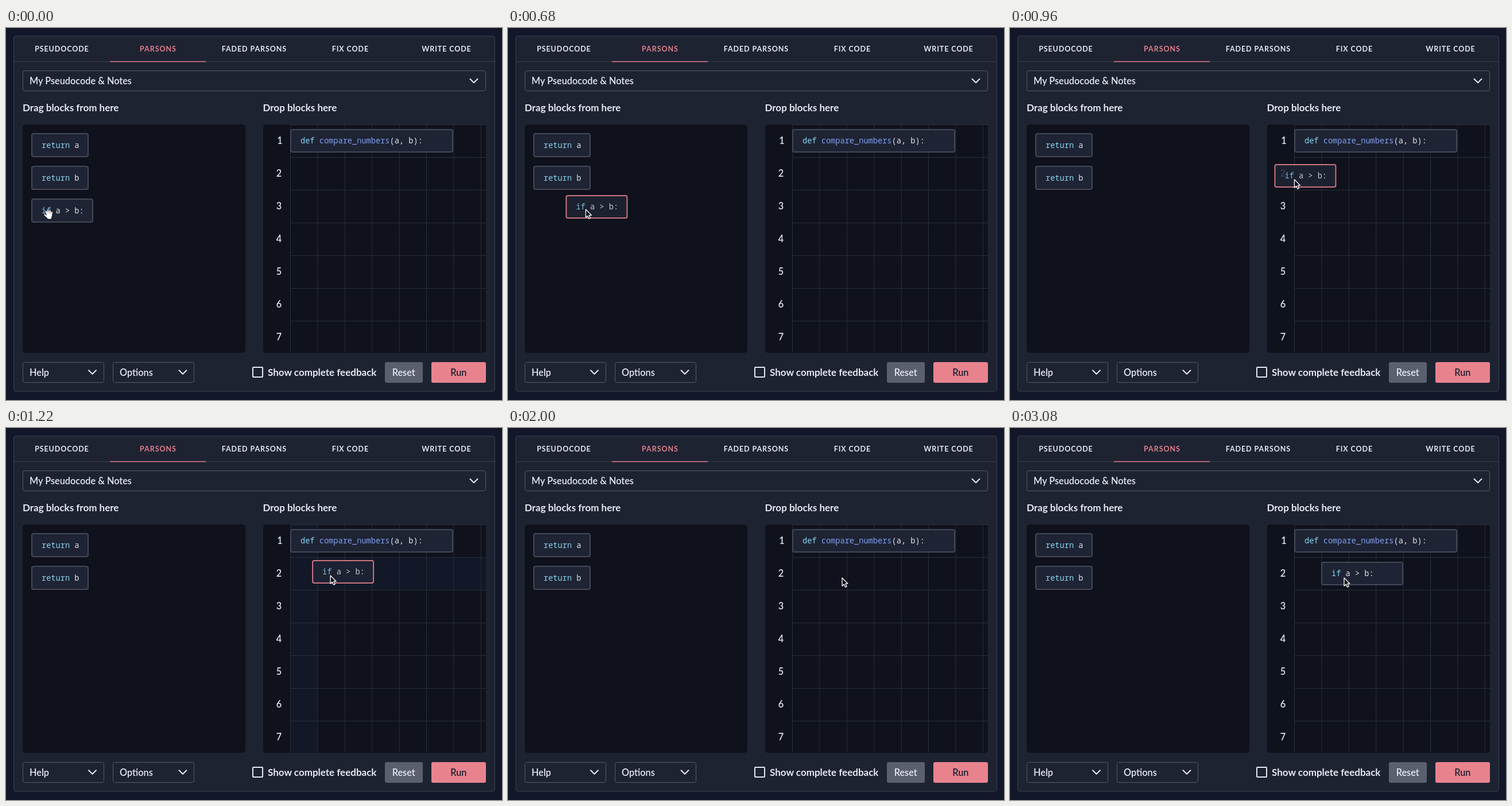
Animation, 864 px wide and 648 px high, one loop 3200 ms. Source, as an HTML page:

```html
<!DOCTYPE html>
<html lang="en">
<head>
<meta charset="utf-8">
<title>Drag a code block</title>
<style>
  html, body { margin: 0; width: 100%; height: 100%; overflow: hidden; background: #13172a; }
  svg { display: block; width: 864px; height: 648px; }
  text { font: 600 16.3px Lato, sans-serif; fill: #e5e8f3; }
  .mid { text-anchor: middle; }
  .tab { font-size: 12.5px; font-weight: 700; letter-spacing: .9px; }
  .label { font-size: 17px; font-weight: 700; }
  .code { font: 400 13.65px "Noto Sans Mono", monospace; white-space: pre; fill: #dfe3ef; }
  .key { fill: #89d6f0; }
  .name { fill: #7f9ff0; }
  .field { fill: none; stroke: #555a6b; }
  .panel { fill: #0f121c; }
  .grid { fill: none; stroke: #2b2f3c; }
  .hot { fill: #121828; }
  .block { fill: #1f2434; stroke: #434859; stroke-width: 2; }
  .chevron { fill: none; stroke: #e5e8f3; stroke-width: 2; stroke-linecap: round; stroke-linejoin: round; }
</style>
</head>
<body>
<svg id="stage" viewBox="0 0 864 648"></svg>
<script>
const LOOP = 3200, GRAB = 440, DROP = 1680, LANDED = 1960, PLACED = 2040;
const GRID = { x: 495.5, y: 168.5, w: 47.4, h: 57 };
const stage = document.getElementById("stage");

function add(tag, attrs, parent = stage) {
  const el = document.createElementNS("http://www.w3.org/2000/svg", tag);
  for (const k in attrs) el.setAttribute(k, attrs[k]);
  parent.append(el);
  return el;
}

function box(x, y, width, height, attrs, parent) {
  return add("rect", { x, y, width, height, rx: 3, ...attrs }, parent);
}

function label(x, y, str, cls = "", attrs = {}) {
  add("text", { x, y, class: cls, ...attrs }).textContent = str;
}

function chevron(x, y) {
  add("path", { d: `M${x - 6.5} ${y - 3.2}l6.5 6.5 6.5 -6.5`, class: "chevron" });
}

// parts: [text, class] pairs drawn on one code line
function codeBlock(x, y, w, h, parts, attrs = {}) {
  const g = add("g", { transform: `translate(${x} ${y})` });
  box(1, 1, w - 2, h - 2, { class: "block", ...attrs }, g);
  const line = add("text", { x: 18, y: h / 2 + 4.8, class: "code" }, g);
  for (const [str, cls] of parts) add("tspan", { class: cls }, line).textContent = str;
  return g;
}

// Card, tabs and controls
box(13.5, 14, 838, 619, { fill: "#1e2332", stroke: "#3a3f50", rx: 4 });
add("path", { d: "M14 58.5H851", stroke: "#3a3f50" });
add("path", { d: "M181 58.5H348", stroke: "#e27e8a", "stroke-width": 1.4 });
["PSEUDOCODE", "PARSONS", "FADED PARSONS", "FIX CODE", "WRITE CODE"].forEach((str, i) =>
  label(97.4 + 167.5 * i, 41, str, "tab mid", i === 1 ? { style: "fill:#e27e8a" } : {}));

box(29.5, 74.5, 806, 35, { class: "field" });
label(41, 98, "My Pseudocode & Notes");
chevron(815, 92);
label(29, 145, "Drag blocks from here", "label");
label(447.5, 145, "Drop blocks here", "label");

box(29.5, 582.5, 141, 35, { class: "field" });
label(41, 606, "Help");
chevron(150.5, 599.5);
box(186.5, 582.5, 141, 35, { class: "field" });
label(198, 606, "Options");
chevron(308, 599.5);
box(430, 591, 17, 17, { fill: "none", stroke: "#e5e8f3", "stroke-width": 2, rx: 1 });
label(456, 605.5, "Show complete feedback", "label");
box(660, 582, 66, 36, { fill: "#5b6070" });
label(692.7, 606, "Reset", "mid");
box(741, 582, 95, 36, { fill: "#e8838e" });
label(788.3, 606, "Run", "mid", { style: "fill:#1c2030" });

// Panels and drop grid
box(29, 168, 388, 398, { class: "panel", rx: 5 });
box(448, 168, 388, 398, { class: "panel", rx: 5 });
const hotRow = add("rect", { x: GRID.x, width: 340.5, height: GRID.h, class: "hot" });
const hotCol = add("rect", { y: 168, width: GRID.w, height: 398, class: "hot" });
let lines = "";
for (let i = 0; i < 8; i++) lines += `M${GRID.x + GRID.w * i} 168V566`;
for (let i = 0; i < 7; i++) lines += `M${GRID.x} ${GRID.y + GRID.h * i}H836`;
add("path", { d: lines, class: "grid" });
for (let i = 0; i < 7; i++) label(i ? 475.5 : 477, 202 + GRID.h * i, i + 1, "mid");

// Code blocks
const condition = [["if", "key"], [" a > b:", ""]];
codeBlock(44, 183, 100, 42, [["return", "key"], [" a", ""]]);
codeBlock(44, 240, 100, 42, [["return", "key"], [" b", ""]]);
codeBlock(495, 176, 284, 41,
  [["def ", "key"], ["compare_numbers", "name"], ["(a, b):", ""]]);
const waiting = codeBlock(44, 297, 108, 42, condition);
const placed = codeBlock(542, 233, 143, 41, condition);
const dragged = codeBlock(0, 0, 108, 41, condition, { style: "stroke:#e8838e" });
dragged.setAttribute("opacity", .87);

// Cursors
const hand = add("g", {});
const fingers = "M-4.3 -5.5L-2 0M-1 -7L0 0M2.5 -6.5V0M5.6 -4L5 1M-6.3 .5L-2.5 4M-2 0H5L3.8 6.2H-.8Z";
for (const [stroke, width] of [["#10131d", 4.4], ["#fff", 2.5]])
  add("path", { d: fingers, fill: "#fff", stroke, "stroke-width": width,
    "stroke-linecap": "round", "stroke-linejoin": "round" }, hand);
const arrow = add("path", {
  d: "M0 0V14.2L3.3 11.2 5.5 16.2 8 15.1 5.8 10.2H10Z",
  fill: "#0b0d13", stroke: "#fff", "stroke-width": 1.3, "stroke-linejoin": "round"
});

// time, block x, block y, pointer x, pointer y
const path = [
  [440, 44, 297, 78, 323],
  [680, 100, 291, 135, 316],
  [780, 268, 259, 305, 286],
  [960, 460, 237, 495, 264],
  [1220, 533, 230, 565, 257],
  [1440, 548, 234, 582, 261]
];

const slope = (i, k) => (path[i + 1][k] - path[i][k]) / (path[i + 1][0] - path[i][0]);

function tangent(i, k) {
  if (i === 0 || i === path.length - 1) return 0;
  const a = slope(i - 1, k), b = slope(i, k);
  return a * b > 0 ? 2 * a * b / (a + b) : 0;
}

// Monotone cubic through the path rows
function at(t, k) {
  const last = path.length - 1;
  if (t <= path[0][0]) return path[0][k];
  if (t >= path[last][0]) return path[last][k];
  const i = path.findIndex(p => p[0] > t) - 1;
  const d = path[i + 1][0] - path[i][0], u = (t - path[i][0]) / d;
  const s = u * u * (3 - 2 * u);
  return path[i][k] * (1 - s) + path[i + 1][k] * s
    + d * u * (1 - u) * ((1 - u) * tangent(i, k) - u * tangent(i + 1, k));
}

const clamp = v => Math.min(1, Math.max(0, v));
const show = (el, on) => el.setAttribute("visibility", on ? "visible" : "hidden");
const move = (el, x, y) => el.setAttribute("transform", `translate(${x.toFixed(2)} ${y.toFixed(2)})`);

function draw(t) {
  const dragging = t >= GRAB && t < DROP;
  const settle = 1 - (1 - clamp((t - DROP) / 250)) ** 3;
  const x = at(t, 1), y = at(t, 2);
  show(waiting, t < GRAB);
  show(dragged, t >= GRAB && t < LANDED);
  show(placed, t >= PLACED);
  move(dragged, x + (542 - x) * settle, y + (233 - y) * settle);

  const col = Math.floor((x - GRID.x) / GRID.w);
  const row = Math.floor((y + 20 - GRID.y) / GRID.h);
  show(hotRow, dragging && col >= 0);
  show(hotCol, dragging && col >= 0);
  hotRow.setAttribute("y", GRID.y + row * GRID.h);
  hotCol.setAttribute("x", GRID.x + col * GRID.w);

  const nudge = clamp((t - 20) / 220);
  show(hand, t < GRAB);
  move(hand, 74 + 3 * nudge, 325 - nudge);
  show(arrow, t >= GRAB);
  move(arrow, at(t, 3), at(t, 4));
}

const start = performance.now();
function tick() {
  draw((performance.now() - start) % LOOP);
  requestAnimationFrame(tick);
}
tick();
</script>
</body>
</html>
```
